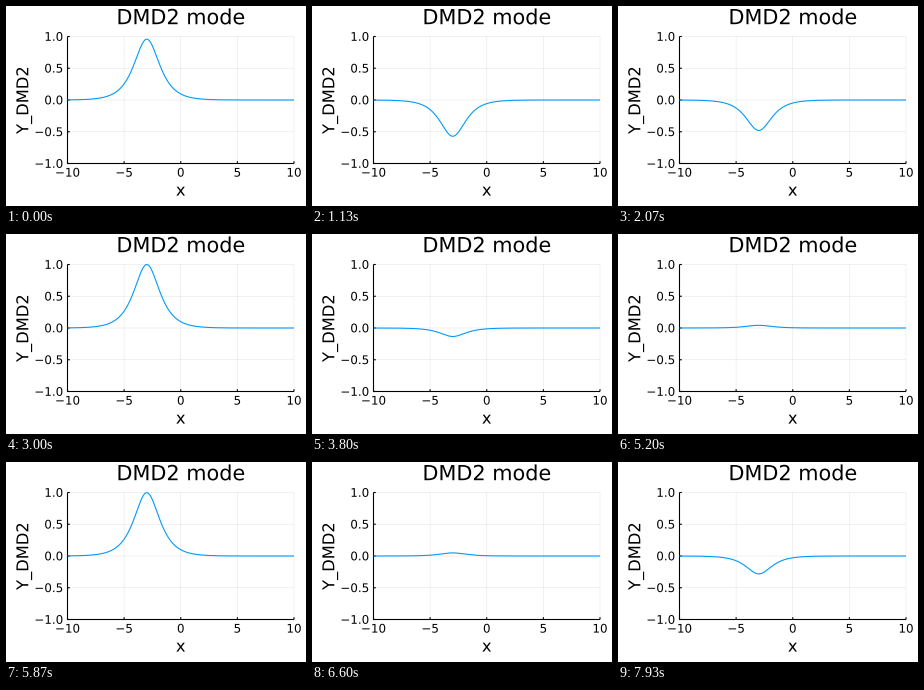
A matplotlib script for the animation above (8 s loop, 300 by 200 pixels).

```python
import numpy as np
import matplotlib.pyplot as plt
from matplotlib.animation import FuncAnimation
from matplotlib.patheffects import Normal

W, H = 300, 200
LOOP, TICK_MS = 8000, 20
POSES = 120
LEFT, RIGHT, TOP, BOTTOM = 61.5, 288, 30.5, 157.5
PX = 0.72  # points per pixel at 100 dpi

plt.rcParams["font.family"] = "DejaVu Sans"
plt.rcParams["text.hinting"] = "none"
fig = plt.figure(figsize=(W / 100, H / 100), dpi=100, facecolor="white")
ax = fig.add_axes([0, 0, 1, 1])
ax.set_xlim(0, W)
ax.set_ylim(H, 0)
ax.axis("off")


def to_x(v):
    return LEFT + (v + 10) / 20 * (RIGHT - LEFT)


def to_y(v):
    return BOTTOM - (v + 1) / 2 * (BOTTOM - TOP)


def stroke(xs, ys, width, color="black", **kw):
    style = dict(snap=False, solid_capstyle="butt")
    style.update(kw)
    return ax.plot(xs, ys, color=color, lw=width * PX, **style)[0]


def label(x, y, text, size, ha="center", **kw):
    # The path effect draws glyph outlines, unhinted and at subpixel places.
    ax.text(x, y, text, fontsize=size * PX, ha=ha, va="baseline",
            path_effects=[Normal()], **kw)


LINE, GRID, TICK = 1.1, 0.55, 2.3
for v in (-10, -5, 0, 5, 10):
    x = to_x(v)
    stroke([x, x], [BOTTOM, TOP], GRID, alpha=0.1)
    stroke([x, x], [BOTTOM, BOTTOM - TICK], LINE)
    label(x, 170.6, str(v).replace("-", "\u2212"), 11.9)

for v in (-1, -0.5, 0, 0.5, 1):
    y = to_y(v)
    stroke([LEFT, RIGHT], [y, y], GRID, alpha=0.1)
    stroke([LEFT, LEFT + TICK], [y, y], LINE)
    label(57.2, y + 4.3, f"{v:.1f}".replace("-", "\u2212"), 11.9, ha="right")

stroke([LEFT, LEFT, RIGHT], [TOP, BOTTOM, BOTTOM], LINE,
       solid_joinstyle="miter")

label(174.7, 18.2, "DMD2 mode", 20.8)
label(174.7, 189.6, "x", 16.3)
label(22.3, 94.2, "Y_DMD2", 16.3, rotation=90, rotation_mode="anchor")

x = np.linspace(-10, 10, 400)
mode = 1 / np.cosh(x + 3)
STEP = 2.3 * 4 * np.pi / 199
curve = stroke(to_x(x), to_y(mode), LINE, "#009afa")


def update(k):
    # 15 poses per second, each starting on the 20 ms clock
    n = int((k * TICK_MS + 15) * POSES / LOOP)
    curve.set_ydata(to_y(mode * np.cos(STEP * (n - 2))))
    return (curve,)


anim = FuncAnimation(fig, update, frames=LOOP // TICK_MS, interval=TICK_MS,
                     repeat=True, repeat_delay=0, blit=False)
plt.show()
```
